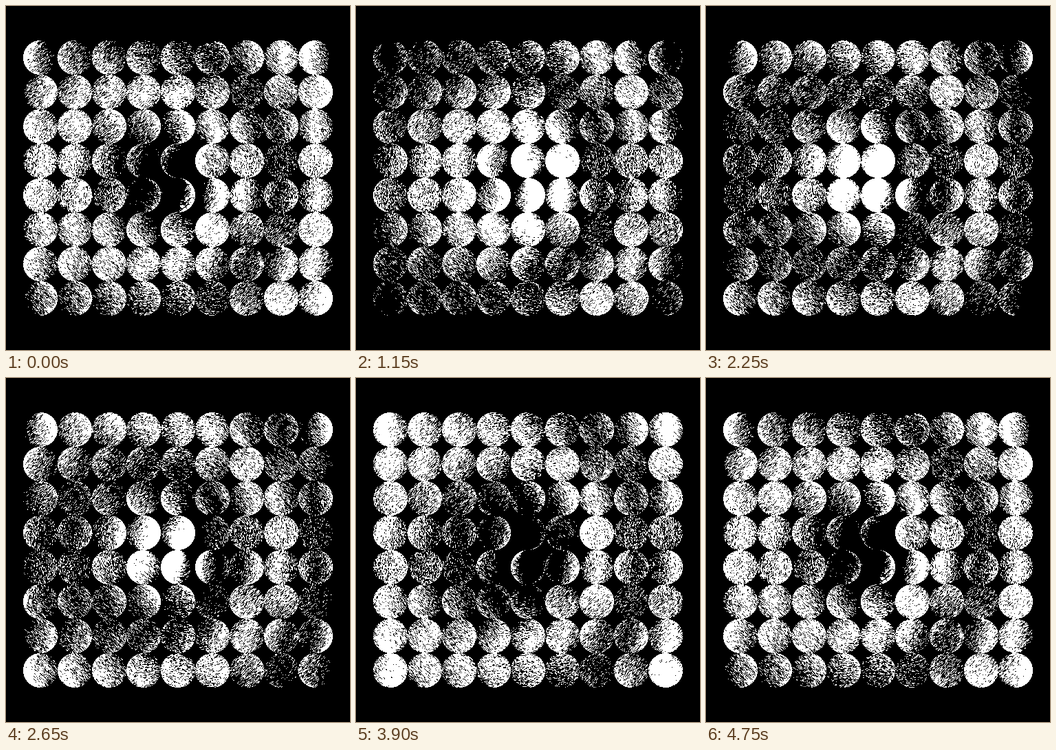
An HTML page with a canvas for the animation above (4.8 s loop, 500 by 500 pixels).

```html
<!DOCTYPE html>
<html>
<head>
<meta charset="utf-8">
<style>
html, body { margin: 0; width: 100%; height: 100%; overflow: hidden; background: #000; }
canvas { display: block; }
</style>
</head>
<body>
<canvas id="stage" width="500" height="500"></canvas>
<script>
const SIZE = 500, CELL = 50, R = 25, LEFT = 25, TOP = 50, COLS = 9, ROWS = 8;
const LOOP = 4800, STEP = 50, TAU = Math.PI * 2;
const BASE = 5.328, WAVE = 3.587, WAVE_LENGTH = 285, SLOPE = 0.014;
const JITTER = 1.5, JITTER_LENGTH = 330;

const ctx = document.getElementById('stage').getContext('2d');
const image = ctx.createImageData(SIZE, SIZE);
const pixels = new Uint32Array(image.data.buffer);
const WHITE = 0xffffffff, BLACK = 0xff000000;

let seed = 7;
function random() {
  seed = (seed + 0x6d2b79f5) | 0;
  let h = Math.imul(seed ^ (seed >>> 15), seed | 1);
  h ^= h + Math.imul(h ^ (h >>> 7), h | 61);
  return ((h ^ (h >>> 14)) >>> 0) / 4294967296;
}
const grain = Float32Array.from({ length: SIZE * SIZE }, random);

// Grain smeared along the direction (tx, ty), centred on zero
function streak(x, y, tx, ty) {
  let sum = -2;
  for (let s = -1.5; s < 2; s++) {
    sum += grain[Math.round(y + ty * s) * SIZE + Math.round(x + tx * s)];
  }
  return sum;
}

// Phase at which a pixel is in the middle of its lit half-turn
function litPhase(x, y, u, v, dir) {
  const dx = x + 0.5 - SIZE / 2, dy = y + 0.5 - SIZE / 2;
  const d = Math.hypot(dx, dy);
  const field = BASE + WAVE * Math.cos(Math.PI * d / WAVE_LENGTH) - SLOPE * dx;
  const spread = JITTER * Math.sin(Math.PI * d / JITTER_LENGTH);
  const longitude = Math.atan2(u, Math.sqrt(1 - u * u - v * v));
  return field + spread * streak(x, y, -dy / d, dx / d) + dir * longitude;
}

const dots = [];
for (let y = TOP; y < TOP + ROWS * CELL; y++) {
  for (let x = LEFT; x < LEFT + COLS * CELL; x++) {
    const u = ((x - LEFT) % CELL + 0.5 - R) / R;
    const v = ((y - TOP) % CELL + 0.5 - R) / R;
    if (u * u + v * v >= 1) continue;
    const dir = Math.floor((y - TOP) / CELL) % 2 ? 1 : -1;
    dots.push({ at: y * SIZE + x, phase: litPhase(x, y, u, v, dir) });
  }
}

pixels.fill(BLACK);
const start = performance.now();
let shown = -1;
function draw() {
  const step = Math.floor(((performance.now() - start) % LOOP) / STEP);
  if (step !== shown) {
    shown = step;
    const angle = step * STEP / LOOP * TAU;
    for (const { at, phase } of dots) {
      pixels[at] = Math.cos(angle - phase) > 0 ? WHITE : BLACK;
    }
    ctx.putImageData(image, 0, 0);
  }
  requestAnimationFrame(draw);
}
draw();
</script>
</body>
</html>
```
